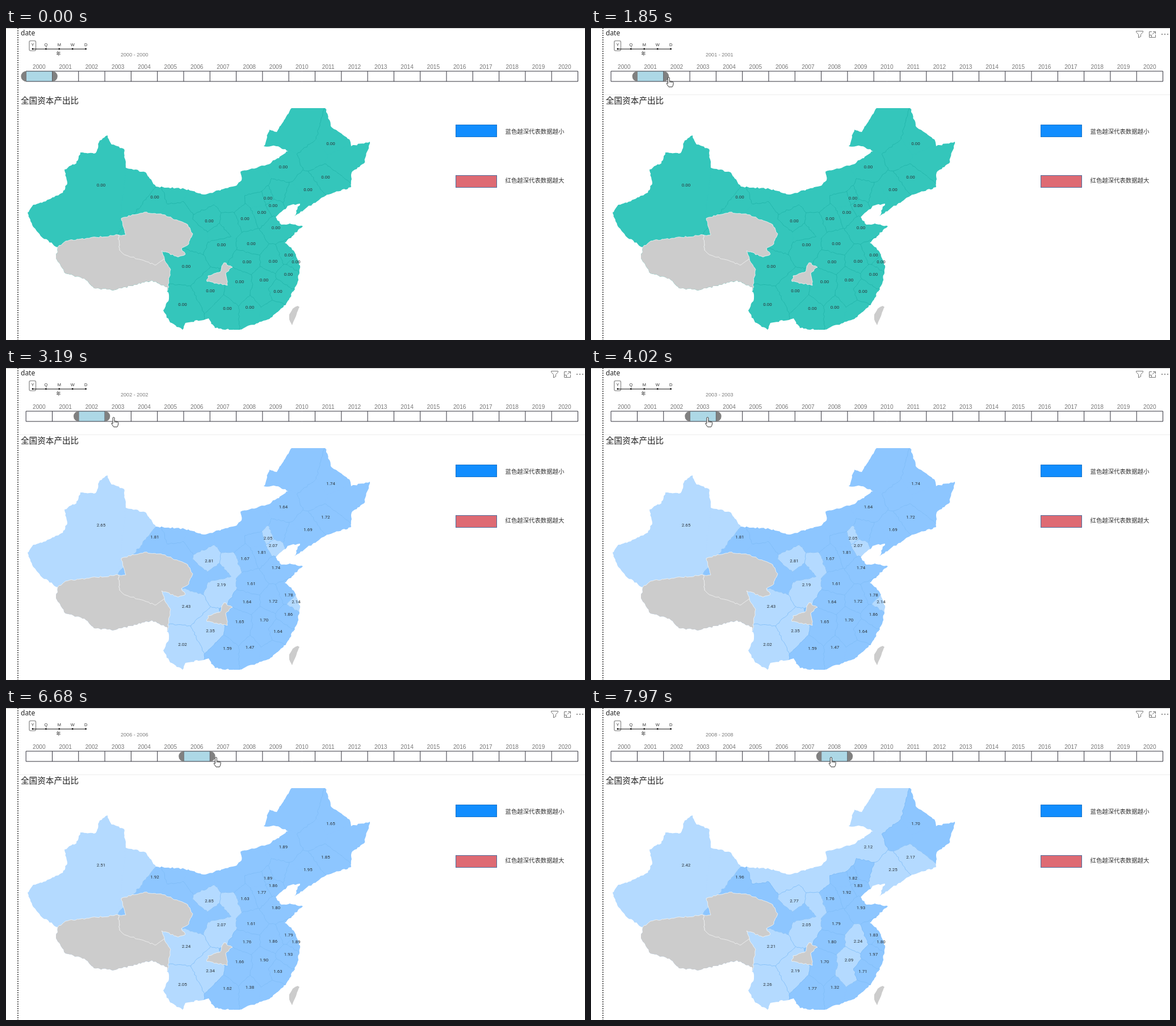
Write an HTML page with a canvas that moves like this. It is 1020 by 549 pixels and loops after 8 s.

```html
<!DOCTYPE html>
<html lang="zh">
<head>
<meta charset="utf-8">
<style>
html, body { margin: 0; width: 100%; height: 100%; overflow: hidden; background: #fff; }
canvas { display: block; width: 1020px; height: 549px; }
</style>
</head>
<body>
<canvas id="stage" width="1020" height="549"></canvas>
<script>
const ctx = document.getElementById('stage').getContext('2d');
const LOOP = 8000, FIRST_YEAR = 2000;
const SANS = '"Liberation Sans", Arial, sans-serif';
const CJK = '"Noto Sans CJK SC", "Noto Sans CJK", sans-serif';
const TEAL = '#34c6bb', BLUE = '#8dc6ff', PALE = '#b4daff', GREY = '#ccc';

// --- map geometry ---
const points = s => s.trim().split(/\s+/).map(p => p.split(',').map(Number));

function noise(x, y, k) {
  const v = Math.sin(Math.round(x * 10) * 12.9898 + Math.round(y * 10) * 78.233 + k) * 43758.5453;
  return v - Math.floor(v) - 0.5;
}

// A straight run with fine raggedness that is the same in both directions.
function raggedTo(path, [x, y], [x2, y2], amount) {
  const n = Math.max(1, Math.round(Math.hypot(x2 - x, y2 - y) / 3.5));
  for (let j = 1; j < n; j++) {
    const px = x + (x2 - x) * j / n, py = y + (y2 - y) * j / n;
    path.lineTo(px + noise(px, py, 0) * amount, py + noise(px, py, 9) * amount);
  }
  path.lineTo(x2, y2);
}

function ragged(pts, amount = 2.5) {
  const path = new Path2D();
  path.moveTo(...pts[0]);
  pts.forEach((p, i) => raggedTo(path, p, pts[(i + 1) % pts.length], amount));
  path.closePath();
  return path;
}

const west = `91,386 62,367 46,346 38,325 48,311 70,305 100,290 108,272 103,249 124,238 131,219
  158,220 165,198 179,189 186,205 208,213 211,246 246,254 264,279 `;
const north = `314,283 349,293 404,278 415,268 413,253 462,240 486,224 497,217 476,208 454,208
  464,179 477,183 503,141 503,136 562,136 `;
const east = `562,141 574,175 605,196 608,208 641,200 631,238 609,254 608,280 563,295 508,331
  518,309 500,312 475,332 485,346 500,344 523,349 491,378 507,392 518,418 513,450 493,487
  464,512 408,532 `;
const south = `368,528 357,511 316,519 311,531 289,518 277,497 287,477 284,456 257,444 192,461
  155,458 138,441 105,432 88,405`;
const land = ragged(points(west + north + east + south));
const island = ragged(points('514,489 517,491 504,523 499,513 499,504 505,494'), 1);

const blanks = [
  '384,413 399,421 387,432 390,453 371,449 354,446 356,436 376,430',
  '91,386 105,375 142,370 198,364 200,391 255,412 279,406 290,425 285,458 280,475 60,475 60,390',
  `198,364 211,364 203,335 244,324 273,327 320,346 329,362 322,380 309,388 316,398 303,403
   274,392 279,406 264,417 212,400 200,391`
].map(s => ragged(points(s)));

// A region is the land nearest to its sites; the first site carries the label.
// Values are for 2001, 2004 and 2007.
const regions = [];
const region = (sites, ...values) => regions.push({ sites: points(sites), values });
region('488.5,244 520,190 440,275 395,305 340,300 294,286', 1.59, 1.79, 2.12);
region('572,203 545,222 585,233', 1.82, 1.66, 1.70);
region('563,262.5', 1.77, 1.76, 2.17);
region('532,284 505,300', 1.65, 1.84, 2.25);
region('450.5,324 447,303 478,292', 1.90, 1.75, 1.92);
region('461.5,299', 2.12, 1.94, 1.82);
region('470.5,312', 2.18, 1.91, 1.83);
region('421,335', 1.75, 1.61, 1.76);
region('475.5,351', 1.75, 1.76, 1.93);
region('432,379', 1.69, 1.57, 1.79);
region('262,297 300,330 335,365 375,362', 1.76, 1.89, 1.96);
region('379.5,381 395,345', 2.26, 2.10, 2.05);
region('358,339', 2.76, 2.86, 2.77);
region('167.5,276 247,285', 2.70, 2.56, 2.42);
region('317.5,419', 2.54, 2.28, 2.21);
region('311,486.5', 2.09, 2.00, 2.26);
region('360,462.5', 2.29, 2.37, 2.19);
region('390,493', 1.64, 1.58, 1.77);
region('429.5,491.5 468,497', 1.50, 1.41, 1.32);
region('411.5,446 408,470', 1.66, 1.65, 1.70);
region('424.5,411.5', 1.59, 1.73, 1.80);
region('470.5,410', 1.78, 1.76, 2.24);
region('454.5,443.5 452,472', 1.65, 1.82, 2.09);
region('479,463.5', 1.68, 1.62, 1.71);
region('497.5,433.5', 1.83, 1.91, 1.97);
region('498,399', 1.79, 1.78, 1.83);
region('511,411', 2.26, 1.96, 1.80);

const sites = regions.flatMap(owner => owner.sites.map(at => ({ at, owner })));

// Keeps the part of a cell nearer to a than to b; each corner notes who lies across its edge.
function cut(cell, a, b) {
  const [ax, ay] = a.at, [bx, by] = b.at, out = [];
  const side = ([x, y]) => (x - (ax + bx) / 2) * (bx - ax) + (y - (ay + by) / 2) * (by - ay);
  cell.forEach((p, i) => {
    const q = cell[(i + 1) % cell.length], dp = side(p.at), dq = side(q.at), u = dp / (dp - dq);
    if (dp <= 0) out.push(p);
    if (dp <= 0 !== dq <= 0) {
      const at = [0, 1].map(k => p.at[k] + (q.at[k] - p.at[k]) * u);
      out.push({ at, across: dp <= 0 ? b : p.across });
    }
  });
  return out;
}

const borders = new Path2D();
for (const r of regions) r.path = new Path2D();
sites.forEach((site, i) => {
  let cell = points('0,100 700,100 700,560 0,560').map(at => ({ at }));
  for (const other of sites) if (other !== site) cell = cut(cell, site, other);
  site.owner.path.addPath(ragged(cell.map(c => c.at)));
  cell.forEach(({ at, across }, k) => {
    if (!across || across.owner === site.owner || sites.indexOf(across) < i) return;
    borders.moveTo(...at);
    raggedTo(borders, at, cell[(k + 1) % cell.length].at, 2.5);
  });
});

// Smooth curve through the three known years.
function valueIn([a, b, c], year) {
  const u = (year - 2004) / 3;
  return b + (c - a) / 2 * u + ((a + c) / 2 - b) * u * u;
}

// --- timing ---
const clicks = [1390, 2530, 3820, 4700, 5390, 6340, 7080, 7970];
const LAG = 490;
const yearAt = t => FIRST_YEAR + clicks.filter(c => c <= t).length;
const tipStarts = [2390, 3680];

// Pointer moves along the slicer: start, duration, x reached.
const hops = [[980, 140, 117], [1600, 440, 150], [2650, 750, 199], [3880, 600, 245],
  [4750, 440, 294], [5700, 500, 331], [6360, 310, 370], [7350, 490, 423]];

function ease(t, start, duration) {
  const u = Math.min(1, Math.max(0, (t - start) / duration));
  return u * u * (3 - 2 * u);
}

function pointerAt(t) {
  if (t < 110) return null;
  const enter = ease(t, 110, 800);
  let x = 270 - 120 * enter;
  for (const [start, duration, to] of hops) x += (to - x) * ease(t, start, duration);
  return [x, 549 - 462 * enter];
}

// --- drawing ---
function text(s, x, y, size, color, family = SANS, align = 'left') {
  ctx.font = `${size}px ${family}`;
  ctx.fillStyle = color;
  ctx.textAlign = align;
  ctx.fillText(s, x, y);
}

function line(color, width, ...xy) {
  ctx.strokeStyle = color;
  ctx.lineWidth = width;
  ctx.beginPath();
  for (let i = 0; i < xy.length; i += 2) ctx.lineTo(xy[i], xy[i + 1]);
  ctx.stroke();
}

function box(x, y, w, h, fill, stroke) {
  ctx.fillStyle = fill;
  ctx.fillRect(x, y, w, h);
  ctx.strokeStyle = stroke;
  ctx.lineWidth = 1;
  ctx.strokeRect(x + 0.5, y + 0.5, w - 1, h - 1);
}

function drawMap(year) {
  const plain = year === FIRST_YEAR;
  ctx.fillStyle = GREY;
  ctx.fill(island);
  ctx.save();
  ctx.beginPath();
  ctx.rect(0, 141, 1020, 390);
  ctx.clip();
  ctx.clip(land);
  ctx.lineJoin = 'round';
  ctx.lineWidth = 0.8;
  for (const r of regions) {
    ctx.fillStyle = ctx.strokeStyle = plain ? TEAL : valueIn(r.values, year) >= 2 ? PALE : BLUE;
    ctx.fill(r.path);
    ctx.stroke(r.path);
  }
  ctx.strokeStyle = plain ? '#1fb3a8' : '#7dbcf6';
  ctx.stroke(borders);
  ctx.fillStyle = GREY;
  ctx.strokeStyle = '#f4f4f4';
  for (const p of blanks) {
    ctx.fill(p);
    ctx.stroke(p);
  }
  ctx.restore();
  for (const { sites: [[x, y]], values } of regions) {
    const label = (plain ? 0 : valueIn(values, year)).toFixed(2);
    text(label, x, y + 2.9, 8, '#2b3338', 'Roboto, sans-serif', 'center');
  }
}

function drawSlicer(year) {
  text('date', 26, 12.5, 12, '#222', '"Noto Sans", sans-serif');
  ctx.strokeStyle = '#a0a0a0';
  ctx.lineWidth = 1.6;
  ctx.beginPath();
  ctx.roundRect(41, 22.5, 11.5, 17.5, 2.5);
  ctx.stroke();
  line('#111', 1.2, 47, 37, 141, 37);
  [...'YQMWD'].forEach((c, i) => {
    const x = 47 + i * 23.4;
    text(c, x, 32.3, 7.5, '#333', SANS, 'center');
    ctx.fillStyle = '#111';
    ctx.fillRect(x - 1.2, 35.5, 2.4, 2.6);
  });
  text('年', 92.5, 48, 8, '#222', CJK, 'center');
  text(`${year} - ${year}`, 202, 50.3, 9.1, '#7c7c7c');

  const cell = 46.3, count = 21, edge = i => 35.2 + i * cell;
  const left = edge(year - FIRST_YEAR);
  ctx.fillStyle = '#add8e6';
  ctx.fillRect(left, 76, cell, 18);
  for (const y of [76, 94]) line('#33333d', 1, edge(0), y, edge(count), y);
  for (let i = 0; i <= count; i++) {
    line('#33333d', 1, edge(i), 76, edge(i), 94);
    if (i < count) text(FIRST_YEAR + i, edge(i + 0.5), 72.2, 10.1, '#777', SANS, 'center');
  }
  ctx.fillStyle = '#808080';
  for (const [x, from] of [[left + 0.5, Math.PI / 2], [left + cell, -Math.PI / 2]]) {
    ctx.beginPath();
    ctx.arc(x, 85, 9.3, from, from + Math.PI);
    ctx.fill();
  }
}

function drawLegend() {
  box(792, 170, 73, 22, '#118dff', '#1c74c8');
  box(792, 259, 73, 22, '#de6a73', '#4a6fa0');
  text('蓝色越深代表数据越小', 879.5, 185.7, 10.4, '#333', CJK);
  text('红色越深代表数据越大', 879.5, 272, 10.4, '#333', CJK);
}

function drawHeader() {
  line('#ececec', 1, 22, 117.5, 1020, 117.5);
  ctx.strokeStyle = ctx.fillStyle = '#777';
  ctx.lineWidth = 1;
  ctx.stroke(new Path2D('M960.5 5.5h12v1.5l-4 4.5v3.5l-4 2v-5.5l-4-4.5z'));
  ctx.stroke(new Path2D('M988 6.5h-4.5v10h11V12M990 6.5h4.5v4M994.5 6.5l-5.5 4.5M983.5 12.5h4v4'));
  for (let i = 0; i < 3; i++) {
    ctx.beginPath();
    ctx.arc(1006 + i * 5, 11, 1.1, 0, 7);
    ctx.fill();
  }
}

const hand = new Path2D('M-1.6 1.2a1.5 1.5 0 0 1 3 0v5l5.4 1.3q1.6.5 1.5 2.2l-.7 4.1-1.4 2.9h-6.2l-3.5-5.2q-1-1.8.8-1.6l1.1 1z');
const knuckles = new Path2D('M1.4 6v2.8M3.6 6.8v2.3M5.8 7.4v2');
const arrow = new Path2D('M0 0v14l3.2-3 2.2 5 2.2-1-2.2-4.8h4.4z');

function drawPointer([x, y]) {
  const shape = y < 96 ? hand : arrow;
  ctx.save();
  ctx.translate(x, y);
  ctx.lineJoin = 'round';
  ctx.lineWidth = 1;
  ctx.fillStyle = '#fff';
  ctx.strokeStyle = '#333';
  ctx.fill(shape);
  ctx.stroke(shape);
  if (shape === hand) ctx.stroke(knuckles);
  ctx.restore();
}

function drawTip([x, y], year) {
  box(x + 8, y + 11, 48, 22, '#fff', '#666');
  text(`年 ${year}`, x + 14.5, y + 25.6, 9.6, '#333', CJK);
}

function draw(t) {
  ctx.fillStyle = '#fff';
  ctx.fillRect(0, 0, 1020, 549);
  line('#c6c6c6', 1, 0, 0.5, 1020, 0.5);
  ctx.setLineDash([2, 2]);
  line('#333', 1.6, 21, 0, 21, 549);
  ctx.setLineDash([]);

  const pointer = pointerAt(t), year = yearAt(t);
  drawSlicer(year);
  text('全国资本产出比', 26, 133.3, 14.6, '#222', CJK);
  drawMap(yearAt(t - LAG));
  drawLegend();
  if (!pointer) return;
  if (pointer[1] < 117) drawHeader();
  if (tipStarts.some(s => t >= s && t < s + 140)) drawTip(pointer, year + 1);
  drawPointer(pointer);
}

function frame() {
  draw(performance.now() % LOOP);
  requestAnimationFrame(frame);
}
frame();
</script>
</body>
</html>
```
